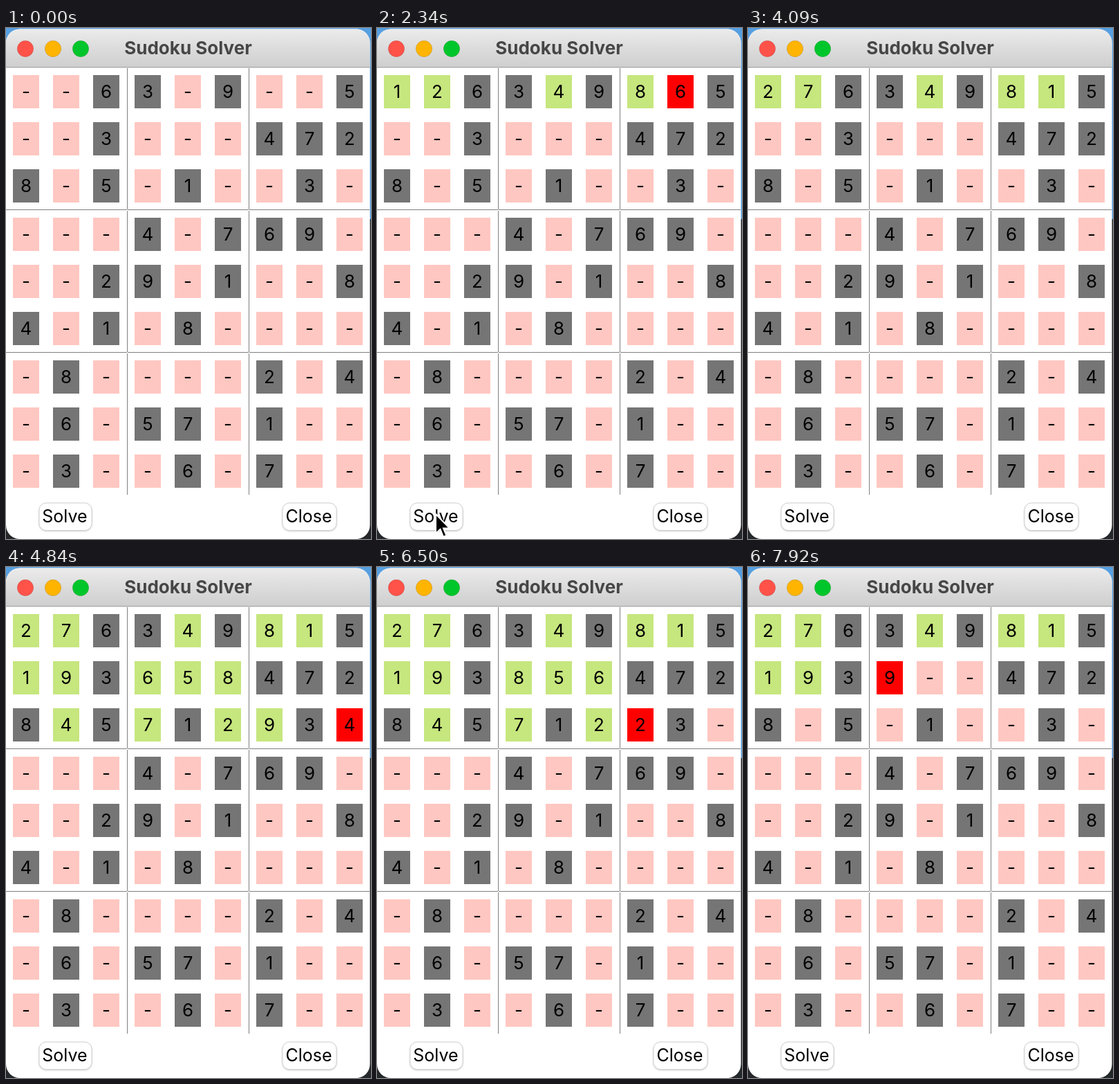
These frames come from a looping animation (528 by 738 pixels, 8000 ms). An HTML page:

```html
<!DOCTYPE html>
<html lang="en">
<head>
<meta charset="utf-8">
<title>Sudoku Solver</title>
<style>
  html, body { margin: 0; width: 100%; height: 100%; overflow: hidden; }
  svg { display: block; }
  text { font: 26px Inter, sans-serif; text-anchor: middle; }
  .title { font-weight: 700; fill: #464646; }
  .button rect { fill: #fff; stroke: #d2d2d2; filter: drop-shadow(0 1px 1px #0003); }
  .button text { font-size: 25px; }
</style>
</head>
<body>
<svg id="stage" width="528" height="738" viewBox="0 0 528 738">
  <defs>
    <linearGradient id="bar" x2="0" y2="1">
      <stop stop-color="#ebebeb"/><stop offset="1" stop-color="#cecece"/>
    </linearGradient>
    <clipPath id="window"><rect y="1.5" width="526.5" height="736.5" rx="20"/></clipPath>
  </defs>
  <rect width="528" height="276" fill="#569fe0"/>
  <rect y="276" width="528" height="462" fill="#25282a"/>
  <g clip-path="url(#window)">
    <rect width="528" height="738" fill="#fff"/>
    <rect y="1" width="528" height="56" fill="url(#bar)"/>
    <rect y="56" width="528" height="1.5" fill="#adadad"/>
  </g>
  <g stroke-opacity=".12" stroke="#000">
    <circle cx="28" cy="30" r="11.7" fill="#ff5249"/>
    <circle cx="68" cy="30" r="11.7" fill="#ffb400"/>
    <circle cx="108" cy="30" r="11.7" fill="#00c62b"/>
  </g>
  <text class="title" x="263.5" y="38">Sudoku Solver</text>
  <path stroke="#808080" fill="none" d="M175.5 58V262M175.5 264V468M175.5 470V674M351.5 58V262M351.5 264V468M351.5 470V674
    M0 262.5H175M176 262.5H351M352 262.5H526M0 468.5H175M176 468.5H351M352 468.5H526"/>
  <g id="cells"></g>
  <g class="button"><rect x="48" y="686" width="76" height="39.5" rx="10"/><text x="85" y="714">Solve</text></g>
  <g class="button"><rect x="400" y="686" width="78" height="39.5" rx="10"/><text x="438" y="714">Close</text></g>
  <path id="cursor" d="M0 0V28L6.5 22L11 33L15.5 31L11 20.5H20Z" stroke="#fff" stroke-width="2"/>
</svg>
<script>
const PUZZLE = [
  '--63-9--5', '--3---472', '8-5-1--3-',
  '---4-769-', '--29-1--8', '4-1-8----',
  '-8----2-4', '-6-57-1--', '-3--6-7--'
].join('');
const COLORS = { given: '#757575', empty: '#ffc7c1', good: '#c6e67e', bad: '#ff0000' };
const LOOP = 8000;
// Solver pace: [tick, trials made]; 12 ticks per second.
const PACE = [[24.85, 0], [28, 21], [40, 101], [58, 230], [67, 293], [78, 372], [95, 491]];
const LAST_TRIAL = 491;

// Backtracking search; every tried digit adds one snapshot.
const board = [...PUZZLE].map(value => ({ value, state: value === '-' ? 'empty' : 'given' }));
const history = [board.slice()];

function fits(index, value) {
  const row = Math.floor(index / 9), col = index % 9;
  return !board.some((cell, i) => {
    const r = Math.floor(i / 9), c = i % 9;
    const sameBox = Math.floor(r / 3) === Math.floor(row / 3) && Math.floor(c / 3) === Math.floor(col / 3);
    return i !== index && cell.value === value && (r === row || c === col || sameBox);
  });
}

function search(index) {
  while (index < 81 && PUZZLE[index] !== '-') index++;
  if (index === 81) return true;
  for (const value of '123456789') {
    const good = fits(index, value);
    board[index] = { value, state: good ? 'good' : 'bad' };
    history.push(board.slice());
    if (history.length > LAST_TRIAL) return true;
    if (good && search(index + 1)) return true;
  }
  board[index] = { value: '-', state: 'empty' };
  return false;
}
search(0);

function add(parent, name, attributes) {
  const node = document.createElementNS('http://www.w3.org/2000/svg', name);
  for (const key in attributes) node.setAttribute(key, attributes[key]);
  return parent.appendChild(node);
}

const cellGroup = document.getElementById('cells');
const cells = board.map((_, i) => {
  const row = Math.floor(i / 9), col = i % 9;
  const x = 10 + 58 * col + 2 * Math.floor(col / 3);
  const y = 68 + 68 * row + 2 * Math.floor(row / 3);
  return {
    box: add(cellGroup, 'rect', { x, y, width: 38, height: 48 }),
    label: add(cellGroup, 'text', { x: x + 19, y: y + 32.5 })
  };
});

function trialsAt(tick) {
  if (tick <= PACE[0][0]) return 0;
  const next = PACE.findIndex(([end]) => tick <= end);
  const [t0, n0] = PACE[next - 1], [t1, n1] = PACE[next];
  return Math.round(n0 + (n1 - n0) * (tick - t0) / (t1 - t0));
}

const ease = p => { p = Math.min(1, Math.max(0, p)); return p * p * (3 - 2 * p); };
const cursor = document.getElementById('cursor');

function draw(tick) {
  history[trialsAt(tick)].forEach(({ value, state }, i) => {
    cells[i].box.setAttribute('fill', COLORS[state]);
    cells[i].label.textContent = value;
  });
  const away = 1 - ease((tick - 12) / 9) + ease((tick - 31) / 6);
  cursor.setAttribute('transform', `translate(${85 + 30 * away} ${702 + 50 * away})`);
}

let shown = -1;
function play() {
  const time = performance.now() % LOOP;
  const tick = Math.floor(Math.floor(time / 10) * 0.12 + 1e-6);
  if (tick !== shown) draw(shown = tick);
  requestAnimationFrame(play);
}
play();
</script>
</body>
</html>
```
